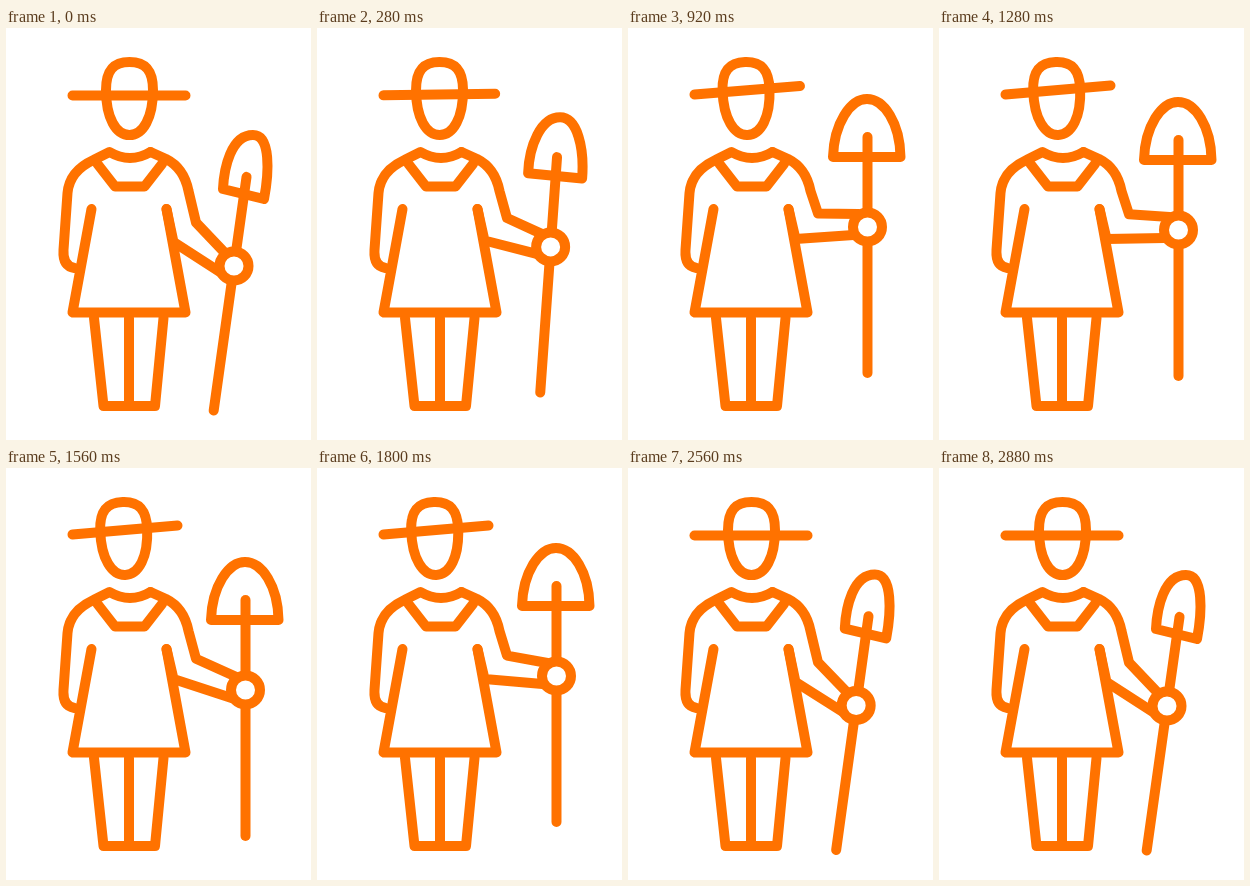
Animation of 305 by 412 pixels, one loop 2920 ms. Source, as an HTML page:

```html
<!DOCTYPE html>
<html lang="en">
<head>
<meta charset="utf-8">
<title>Gardener</title>
<style>
  html, body { margin: 0; width: 100%; height: 100%; overflow: hidden; background: #fff; }
  svg { display: block; width: 100%; height: 100%; }
</style>
</head>
<body>
<svg viewBox="0 0 305 412" fill="none" stroke="#ff7200" stroke-width="10" stroke-linecap="round" stroke-linejoin="round">
  <path d="M88 290L97.500 378H149L157.500 290M123 290V378"/>
  <path d="M85.500 181L66.500 284.500H179.500L160.500 181"/>
  <path d="M91.500 136L109 158.500H138.500L156 136"/>
  <path d="M68.500 240Q56.500 238 57.500 222L61.500 165Q63.500 143 87.500 132L103.500 124Q124 136 144.500 124"/>
  <path id="head" d="M100 62C100 43 107 34 123.500 34S147 43 147 62C147 90 137 107 123.500 107S100 90 100 62Z"/>
  <path id="brim"/>
  <path id="arm"/>
  <path id="handle"/>
  <path id="blade"/>
  <circle id="hand" r="14.500" fill="#fff"/>
</svg>
<script>
const LOOP = 2920;
const $ = id => document.getElementById(id);
const draw = (id, d) => $(id).setAttribute('d', d);
const mix = (a, b, k) => a + (b - a) * k;
const span = (t, from, to) => Math.min(1, Math.max(0, (t - from) / (to - from)));
const smooth = k => k * k * (3 - 2 * k);
const settle = k => 1 - (1 - k) ** 5 * (1 + 5 * k);

// Blade outlines relative to the hand: left corner, curve to tip, curve to right corner
const facing = [-34.5, -70, -33.5, -104, -17, -128, -0.5, -128, 16.5, -128, 32.5, -104, 33, -70];
const turned = [-11, -77, -10, -98, -3, -131, 19, -131, 37, -131, 35, -93, 30, -67];

function pose(t) {
  const lift = settle(span(t, 0, 1080)) - settle(span(t, 1800, LOOP));
  const lean = smooth(span(t, 0, 1080)) - settle(span(t, 1800, 2520));
  const dig = 23 * (smooth(span(t, 1200, 1560)) - smooth(span(t, 1560, 1980)));
  const x = mix(228, 239.5, lift);
  const y = mix(238, 199 + dig, lift);

  $('head').setAttribute('transform', `translate(${-5.6 * lean}) rotate(${-2 * lean} 123 68)`);
  draw('brim', `M66.5 ${67.5 - lean}L${179.5 - 8 * lean} ${67.5 - 10 * lean}`);

  const elbow = 185.5 + (y - 199) * 0.23;
  draw('arm', `M144.5 124L160 131Q178 140 182.5 163L190 ${elbow}L${x - 9} ${y - 13}` +
    `M160.5 181L167.5 ${mix(214, 211, lift)}L${x - 14} ${y + mix(6, 8, lift)}`);

  const tilt = mix(8, 0, lift) * Math.PI / 180;
  const along = d => `${x - d * Math.sin(tilt)} ${y + d * Math.cos(tilt)}`;
  draw('handle', `M${along(-90)}L${along(146)}`);

  const p = turned.map((v, i) => mix(v, facing[i], lift) + (i % 2 ? y : x));
  draw('blade', `M${p.slice(0, 2)}C${p.slice(2)}Z`);

  $('hand').setAttribute('cx', x);
  $('hand').setAttribute('cy', y);
}

function frame() {
  pose(performance.now() % LOOP);
  requestAnimationFrame(frame);
}
frame();
</script>
</body>
</html>
```
